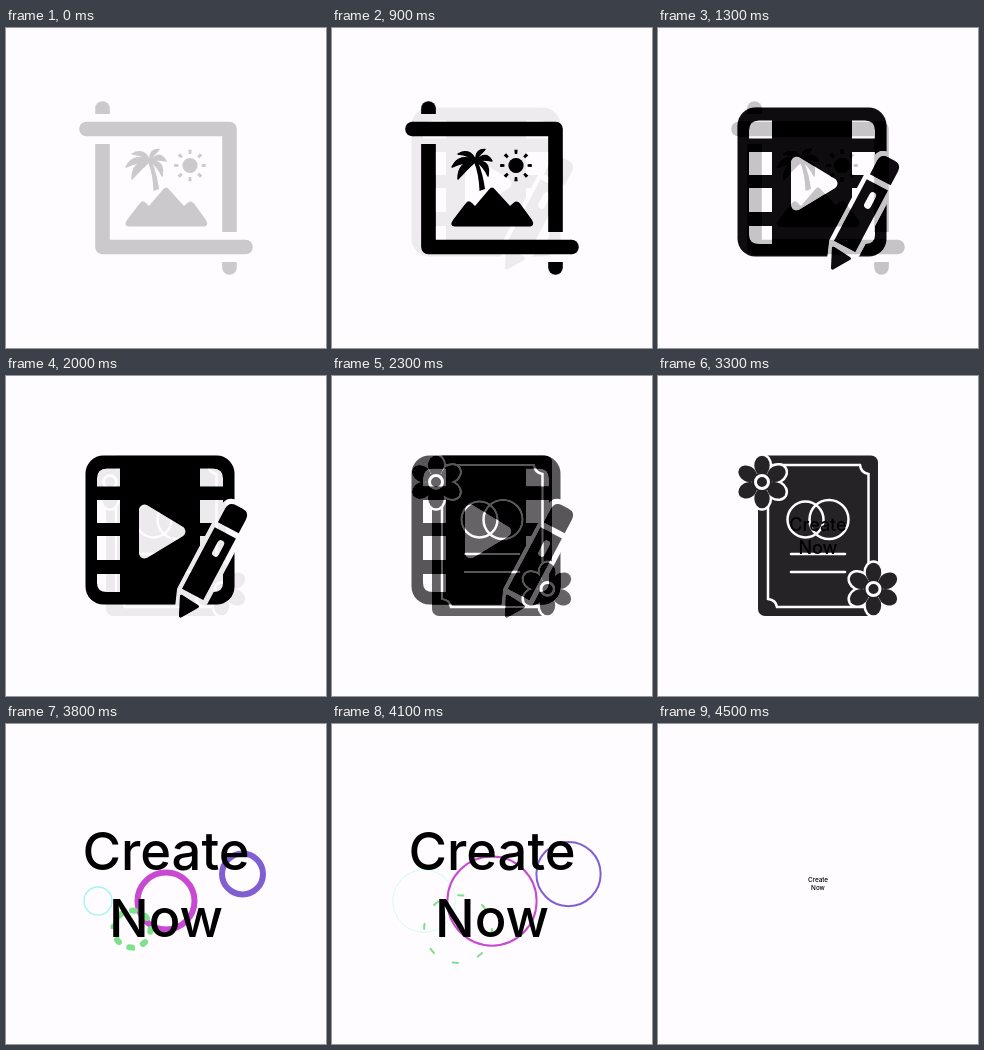
An HTML page for the animation above (4600 ms loop, 320 by 320 pixels).

```html
<!DOCTYPE html>
<html lang="en">
<head>
<meta charset="utf-8">
<title>Create Now</title>
<style>
  html, body { margin: 0; width: 100%; height: 100%; overflow: hidden; background: #fefcff; }
  svg { display: block; width: 100%; height: 100%; }
  /* Icons are light on dark, added together, then inverted, so that overlaps sum to black. */
  #icons { filter: invert(1); fill: #fff; }
  .icon { mix-blend-mode: plus-lighter; opacity: 0; }
  .ink { stroke: #fff; }
  .line { fill: none; stroke: #000; stroke-width: 2.5; stroke-linecap: round; }
  .gap { fill: #000; stroke: #000; stroke-width: 0; stroke-linejoin: round; }
  .ring { fill: none; }
  text { font: 500 52.5px Inter, "Open Sans", sans-serif; text-anchor: middle; }
</style>
</head>
<body>
<svg viewBox="0 0 320 320">
  <defs>
    <g id="cropHalf">
      <path class="ink" d="M80.5 101H223.5V204" fill="none" stroke-width="14.6" stroke-linejoin="round"/>
      <circle cx="80.5" cy="101" r="7.3"/>
      <path d="M89.2 86V80.5a7.3 7.3 0 0 1 14.6 0V86z"/>
    </g>
    <g id="petals">
      <ellipse id="petal" cx="16.5" rx="9.8" ry="7.7"/>
      <use href="#petal" transform="rotate(60)"/>
      <use href="#petal" transform="rotate(120)"/>
      <use href="#petal" transform="rotate(180)"/>
      <use href="#petal" transform="rotate(240)"/>
      <use href="#petal" transform="rotate(300)"/>
    </g>
    <g id="flower">
      <use href="#petals" transform="rotate(30)" stroke="#000" stroke-width="5"/>
      <use href="#petals" transform="rotate(30)"/>
      <circle r="10"/>
      <circle r="6.5" class="line" style="stroke-width:3"/>
    </g>
  </defs>

  <g id="icons">
    <rect width="320" height="320" fill="#010300"/>

    <g class="icon" id="crop">
      <use href="#cropHalf"/>
      <use href="#cropHalf" transform="rotate(180 160 160)"/>
      <path d="M123 198.5Q117 198 121 192L134 175Q136.5 171.5 140 175L143 178L157 161.5Q160 157.5 163 161.5L178 178L182 174.5Q185 172 188 175.5L200 192Q203 198 198 198.5z"/>
      <path d="M142 134Q147 146 147.5 163L153 161Q151 146 146 134z"/>
      <path class="ink" d="M144 133Q128 124 120 139Q131 134 144 133M144 133Q126 133 126 151Q134 142 144 133M144 133Q138 119 126 126Q137 127 144 133M144 133Q143 121 153 121.5Q147 127 144 133M144 133Q154 122 160 133Q152 131 144 133M144 133Q159 132 156 148Q152 139 144 133"
        stroke-width="1.4" stroke-linejoin="round"/>
      <circle cx="184" cy="137.5" r="7.6"/>
      <circle class="ink" cx="184" cy="137.5" r="13.7" fill="none" stroke-width="4.2"
        pathLength="8" stroke-dasharray=".27 .73" stroke-dashoffset=".135"/>
    </g>

    <g class="icon" id="film">
      <rect x="79.5" y="79.5" width="149" height="149" rx="18"/>
      <path class="gap" d="M114 92.500V110.500H91V102.500Q91 92.500 101 92.500zM91 124h23v23h-23zM91 160h23v24h-23zM91 198h23v18h-13Q91 216 91 207z"/>
      <path class="gap" d="M194 92.500V110.500H217V102.500Q217 92.500 207 92.500zM194 124h23v23h-23zM194 160h23v24h-23zM194 198h23v9Q217 216 207 216h-13z"/>
      <path class="gap" d="M138.500 134V177L174 155.500z" style="stroke-width:11"/>
      <g transform="translate(174 241) rotate(28)">
        <path class="gap" d="M0 0L-10 -25V-118Q-10 -124 -4 -124H6Q12 -124 12 -118V-25z" style="stroke-width:12"/>
        <path class="ink" d="M0 -1L-8.500 -19L10.500 -17.500z" stroke-width="3" stroke-linejoin="round"/>
        <path d="M-11.500 -26H12.500V-95.500H-11.500z"/>
        <path d="M-11 -101.500V-117Q-11 -125 -3 -125H4.500Q12.500 -125 12.500 -117V-101.500z"/>
        <path d="M1.500 -73V-84" class="line" style="stroke-width:7"/>
      </g>
    </g>

    <g class="icon" id="invite">
      <rect x="100" y="79.5" width="120" height="160.5" rx="7"/>
      <path class="line" d="M110 89H202Q203 97 210.500 98V231H119Q118 224 110 223z"/>
      <circle class="line" cx="147.5" cy="143.500" r="18"/>
      <circle class="line" cx="171" cy="143.500" r="19.500"/>
      <path class="line" d="M133 178H187M133 196H187"/>
      <use href="#flower" x="104" y="106"/>
      <use href="#flower" x="215.500" y="213"/>
    </g>
  </g>

  <g id="bursts"></g>

  <g id="title">
    <text x="160" y="145.500">Create</text>
    <text x="160" y="212.500">Now</text>
  </g>
</svg>
<script>
  const LOOP = 4600, STEP = 100;
  const byId = id => document.getElementById(id);

  // Tracks are flat lists: time, value, time, value...
  const fades = {
    crop: [0, .2, 200, 1, 900, 1, 1000, .9, 1300, .22, 1400, .04, 1500, 0],
    film: [870, 0, 1300, .94, 1400, 1, 2000, 1, 2100, .95, 2300, .65, 2500, .2, 2700, .03, 3200, .03, 3300, 0],
    invite: [1960, 0, 2500, .95, 2600, 1, 3150, 1, 3300, .85, 3650, .1, 3750, 0]
  };
  const titleScale = [3150, 0, 3500, .8, 3700, .98, 3800, 1, 4180, 1, 4544, 0];

  const bursts = [
    { x: 92, y: 177, color: '#a0f6f0', r: 14, end: 37, width: 1.4 },
    { x: 236.5, y: 150, color: '#805fd0', r: 20.5, end: 36, width: 6 },
    { x: 160, y: 177, color: '#c94ad2', r: 28.5, end: 50, width: 6 },
    { x: 126, y: 205, color: '#7ee28c', r: 18.5, end: 39, width: 6, dots: 8 }
  ];

  function at(t, track) {
    if (t <= track[0]) return track[1];
    for (let i = 2; i < track.length; i += 2) {
      if (t <= track[i]) {
        const p = (t - track[i - 2]) / (track[i] - track[i - 2]);
        return track[i - 1] + (track[i + 1] - track[i - 1]) * p;
      }
    }
    return track[track.length - 1];
  }

  for (const b of bursts) {
    b.node = document.createElementNS(byId('bursts').namespaceURI, 'circle');
    const attrs = { class: 'ring', cx: b.x, cy: b.y, stroke: b.color };
    if (b.dots) Object.assign(attrs, {
      pathLength: b.dots, 'stroke-dasharray': '.2 .8', 'stroke-linecap': 'round'
    });
    for (const name in attrs) b.node.setAttribute(name, attrs[name]);
    byId('bursts').append(b.node);
  }

  function draw(t) {
    for (const id in fades) byId(id).style.opacity = at(t, fades[id]);

    const s = at(t, titleScale);
    byId('title').setAttribute('transform', `translate(160 160) scale(${s}) translate(-160 -160)`);

    for (const b of bursts) {
      const visible = t > 3500 && t < 4250;
      b.node.style.display = visible ? '' : 'none';
      if (!visible) continue;
      b.node.setAttribute('r', at(t, [3500, 0, 3800, b.r, 4200, b.end]));
      b.node.setAttribute('stroke-width', at(t, [3500, 0, 3700, b.width, 3800, b.width, 4250, 0]));
    }
  }

  const start = performance.now();
  function tick() {
    const t = (performance.now() - start) % LOOP;
    draw(Math.floor(t / STEP) * STEP);
    requestAnimationFrame(tick);
  }
  tick();
</script>
</body>
</html>
```
